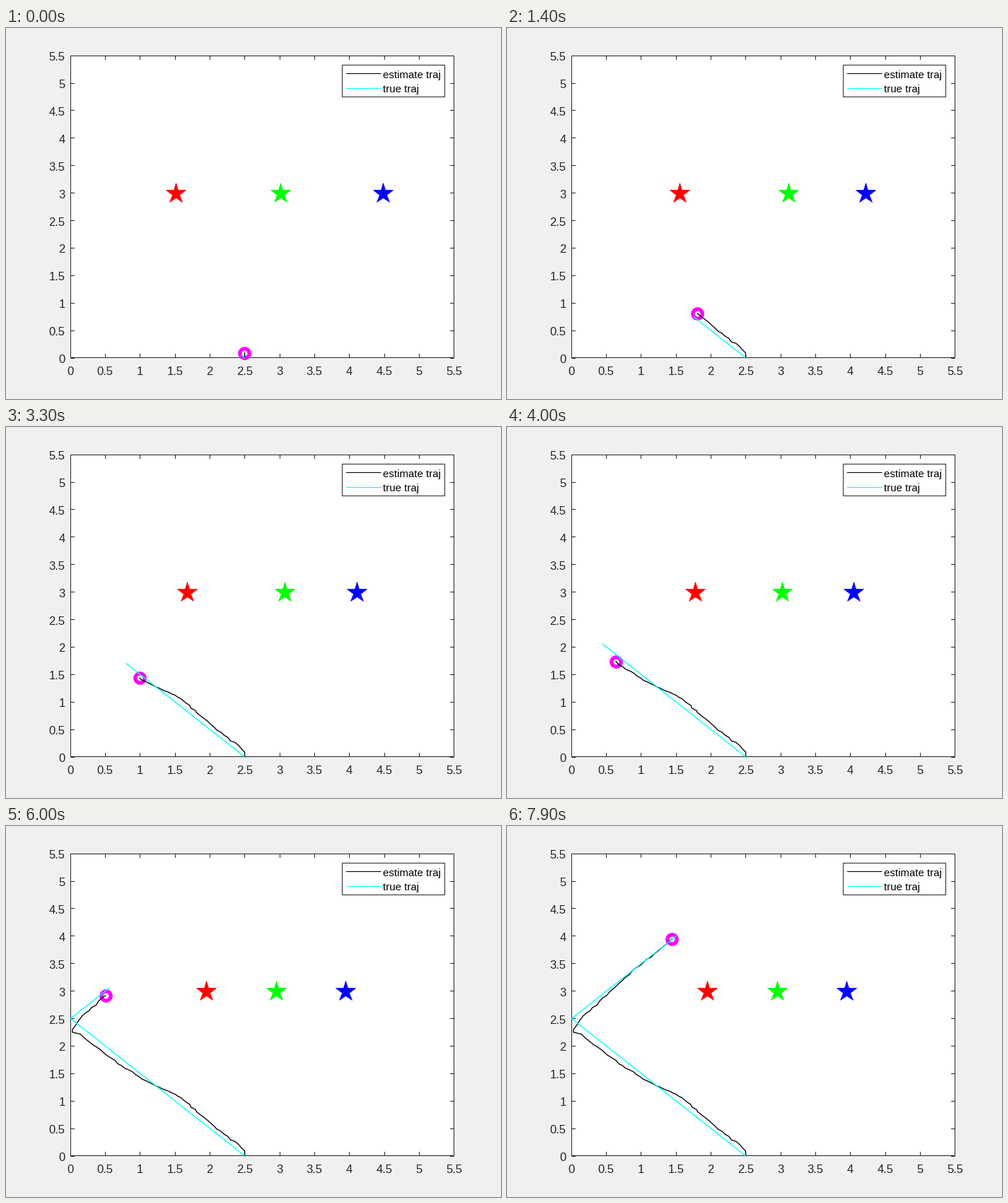
Animation, 700 px wide and 525 px high, one loop 8000 ms. Source, as a matplotlib script:

```python
import numpy as np
import matplotlib.pyplot as plt
from matplotlib.animation import FuncAnimation
from matplotlib.patches import Rectangle

W, H, DPI = 700, 525, 100
PX = 72 / DPI                      # one pixel in points
LEFT, RIGHT, TOP, BOTTOM = 91.5, 633.5, 39.5, 466.5
INK = "#262626"
STEPS = 80
STEP = 0.05                        # true motion per frame on each axis

plt.rcParams["font.family"] = "Liberation Sans"


def sx(x):
    return 91.25 + np.asarray(x) * 542.5 / 5.5


def sy(y):
    return 467 - np.asarray(y) * 427.875 / 5.5


# The true path runs up-left and bounces off the left wall
true_y = np.arange(STEPS + 1) * STEP
true_x = np.abs(2.5 - true_y)

# The estimate is the true path plus a slow drift and a little noise
DRIFT_T = (0, 14, 20, 32, 40, 48, 50, 53, 68, 79)
DRIFT_X = (.05, .065, .14, .185, .18, .08, -.02, -.03, -.08, -.045)
DRIFT_Y = (.05, .05, .01, -.255, -.32, -.245, -.25, -.155, -.09, -.05)
frames = np.arange(STEPS)
noise = np.random.default_rng(4).normal(0, 0.007, (2, STEPS))
est_x = true_x.copy()
est_y = true_y.copy()
est_x[1:] += np.interp(frames, DRIFT_T, DRIFT_X) + noise[0]
est_y[1:] += np.interp(frames, DRIFT_T, DRIFT_Y) + noise[1]

# Landmarks settle through a few key positions
STAR_T = (0, 14, 27, 47, 60)
STARS = {
    "#ff0000": (1.508, 1.547, 1.585, 1.866, 1.94),
    "#00ff00": (3.005, 3.105, 3.11, 2.967, 2.945),
    "#0000ff": (4.475, 4.22, 4.145, 3.995, 3.945),
}

fig = plt.figure(figsize=(W / DPI, H / DPI), dpi=DPI, facecolor="#f0f0f0")
ax = fig.add_axes([0, 0, 1, 1])
ax.set_xlim(0, W)
ax.set_ylim(H, 0)
ax.axis("off")


def line(xs, ys, color=INK, width=1.0, **kw):
    return ax.plot(xs, ys, color=color, lw=width * PX, **kw)[0]


def label(x, y, text, size, ha="left", color=INK):
    ax.text(x, y, text, size=size * PX, ha=ha, va="baseline", color=color, zorder=6)


def box(x0, y0, x1, y1, z):
    ax.add_patch(Rectangle((x0, y0), x1 - x0, y1 - y0, fc="white", ec=INK,
                           lw=PX, snap=False, zorder=z))


def draw_axes():
    box(LEFT, TOP, RIGHT, BOTTOM, 0)
    tick = dict(snap=False, solid_capstyle="butt", zorder=1)
    for v in np.arange(0, 5.6, 0.5):
        px, py = float(sx(v)), float(sy(v))
        cx, cy = np.floor(px) + .5, np.floor(py) + .5
        for edge, d in ((BOTTOM, -5.5), (TOP, 5.5)):
            line([cx, cx], [edge, edge + d], **tick)
        for edge, d in ((LEFT, 5.5), (RIGHT, -5.5)):
            line([edge, edge + d], [cy, cy], **tick)
        label(px - .25, 491, f"{v:g}", 16.67, "center")
        label(83.5, py + 7, f"{v:g}", 16.67, "right")


def draw_legend():
    box(475.5, 52.5, 620.5, 97.5, 5)
    for text, color, y, base in (("estimate traj", "black", 64.5, 71),
                                 ("true traj", "cyan", 85.5, 91)):
        line([481, 530.5], [y, y], color, 1.1, zorder=6, snap=False,
             solid_capstyle="butt")
        label(533, base, text, 15, color="black")


draw_axes()
draw_legend()
stars = [line([], [], c, marker="*", ms=30 * PX, mew=0.7 * PX, zorder=2)
         for c in STARS]
robot = line([], [], "magenta", marker="o", ms=13.33 * PX, mew=5.33 * PX,
             mfc="none", zorder=2)
est = line([], [], "black", 1.33, zorder=3)
true = line([], [], "cyan", 1.33, zorder=3)


def update(i):
    n = i + 2
    est.set_data(sx(est_x[:n]), sy(est_y[:n]))
    true.set_data(sx(true_x[:n]), sy(true_y[:n]))
    robot.set_data([sx(est_x[i + 1])], [sy(est_y[i + 1])])
    for star, xs in zip(stars, STARS.values()):
        star.set_data([sx(np.interp(i, STAR_T, xs))], [sy(3)])
    return [est, true, robot, *stars]


anim = FuncAnimation(fig, update, frames=STEPS, interval=100, repeat=True,
                     repeat_delay=0)
plt.show()
```
